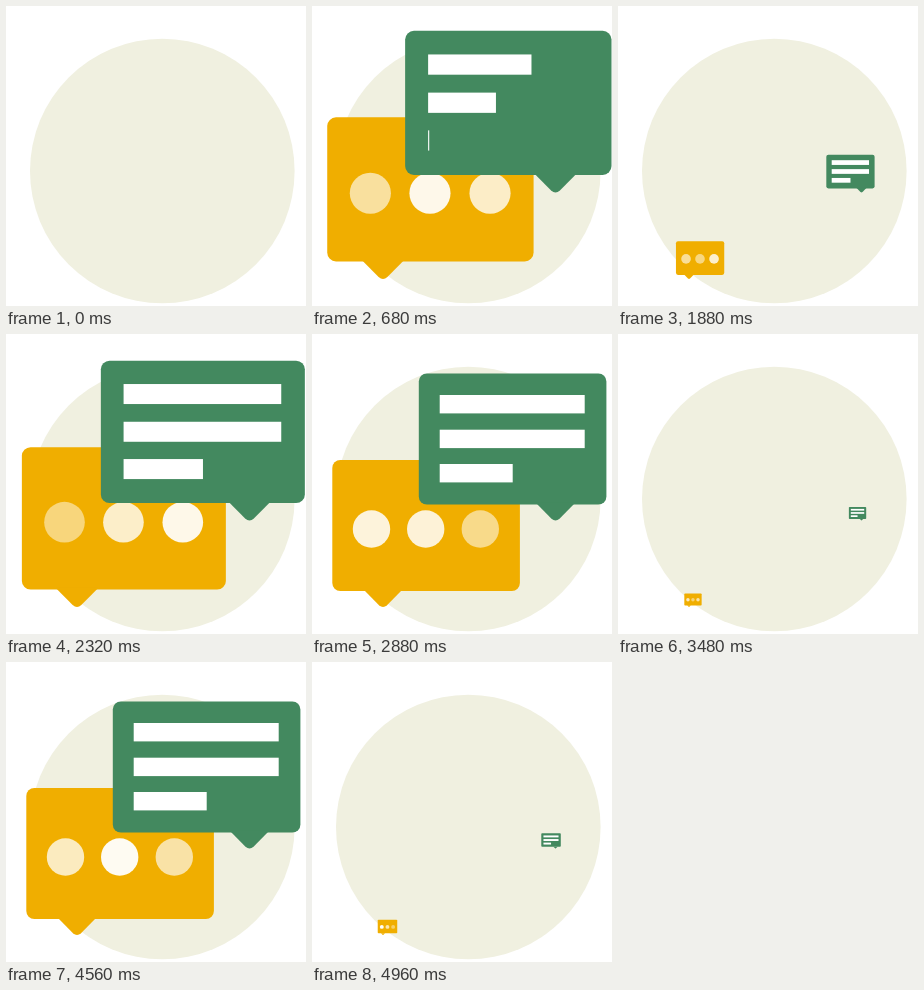
Recreate the animation shown at these times as an HTML page. Size 300 px wide and 300 px high, loop 5000 ms.

```html
<!DOCTYPE html>
<html lang="en">
<head>
<meta charset="utf-8">
<title>Chat bubbles</title>
<style>
html, body { margin: 0; width: 100%; height: 100%; overflow: hidden; background: #fff; }
svg { display: block; width: 100vw; height: 100vh; }
</style>
</head>
<body>
<svg viewBox="0 0 300 300">
  <defs>
    <!-- The tip of the tail is the local origin. -->
    <path id="tail" d="M-20 -18 L-4 -1.8 Q0 1.6 4 -1.8 L20 -18 Z"/>
  </defs>
  <circle cx="156.3" cy="165" r="132.3" fill="#f0f0e0"/>
  <g id="yellow" fill="#f0ae00">
    <rect x="-50.7" y="-147" width="187.6" height="131" rx="8"/>
    <use href="#tail"/>
    <g fill="#fff">
      <circle class="dot" cx="-11.5" cy="-78" r="18.7"/>
      <circle class="dot" cx="42.7" cy="-78" r="18.7"/>
      <circle class="dot" cx="97.3" cy="-78" r="18.7"/>
    </g>
  </g>
  <g id="green" fill="#43895f">
    <rect x="-136.7" y="-147" width="187.6" height="131" rx="8"/>
    <use href="#tail"/>
    <g fill="#fff">
      <rect class="line" x="-115.8" y="-125.5" height="18.4"/>
      <rect class="line" x="-115.8" y="-90.8" height="18.4"/>
      <rect class="line" x="-115.8" y="-56.5" height="18.4"/>
    </g>
  </g>
</svg>
<script>
const LOOP = 5000, STEP = 40, FPS = 30;
const POP = 50;    // frames per pop in and out
const PULSE = 55;  // frames per dot pulse

const yellow = document.getElementById('yellow');
const green = document.getElementById('green');
const dots = [...document.querySelectorAll('.dot')];
const lines = [...document.querySelectorAll('.line')];
const lineStart = [2, 6.5, 20], lineWidth = [145, 145, 73];

const clamp = v => Math.min(1, Math.max(0, v));
const mod = (a, b) => ((a % b) + b) % b;

// Symmetric cubic bezier (a, 0, 1 - a, 1); a = 1/3 is a smoothstep.
function ease(p, a = 1 / 3) {
  let lo = 0, hi = 1, t = 0.5;
  for (let i = 0; i < 24; i++) {
    const u = 1 - t;
    const x = 3 * u * u * t * a + 3 * u * t * t * (1 - a) + t * t * t;
    if (x < p) lo = t; else hi = t;
    t = (lo + hi) / 2;
  }
  return t * t * (3 - 2 * t);
}

const ramp = (f, from, to, a) => {
  const p = clamp((f - from) / (to - from));
  return p === 0 || p === 1 ? p : ease(p, a);
};

const popScale = f =>
  ramp(f, 0, 15.5, 0.58)
  + 0.1 * ramp(f, 15.5, 20)
  - 0.1 * ramp(f, 20, 35)
  - ramp(f, 40, 50);

function place(node, x, y, s) {
  node.setAttribute('transform', `translate(${x} ${y}) scale(${s})`);
  node.style.display = s > 0.0005 ? '' : 'none';
}

function draw(ms) {
  const tick = Math.floor((ms % LOOP) / STEP + 1e-6);
  const f = Math.floor(tick * STEP * FPS / 1000 + 1e-6);
  const s = popScale(f % POP);
  place(yellow, 71, 273, s);
  place(green, 243.5, 186.5, s);

  dots.forEach((dot, i) => {
    const w = mod((f - 10) / PULSE + i / 4, 1);
    dot.setAttribute('opacity', 1 - 0.6 * Math.abs(2 * w - 1));
  });
  lines.forEach((line, i) => {
    const w = lineWidth[i] * ramp(f, lineStart[i], lineStart[i] + 30);
    line.setAttribute('width', Math.max(1, w));
  });
}

const start = performance.now();
function loop() {
  draw(performance.now() - start);
  requestAnimationFrame(loop);
}
loop();
</script>
</body>
</html>
```
